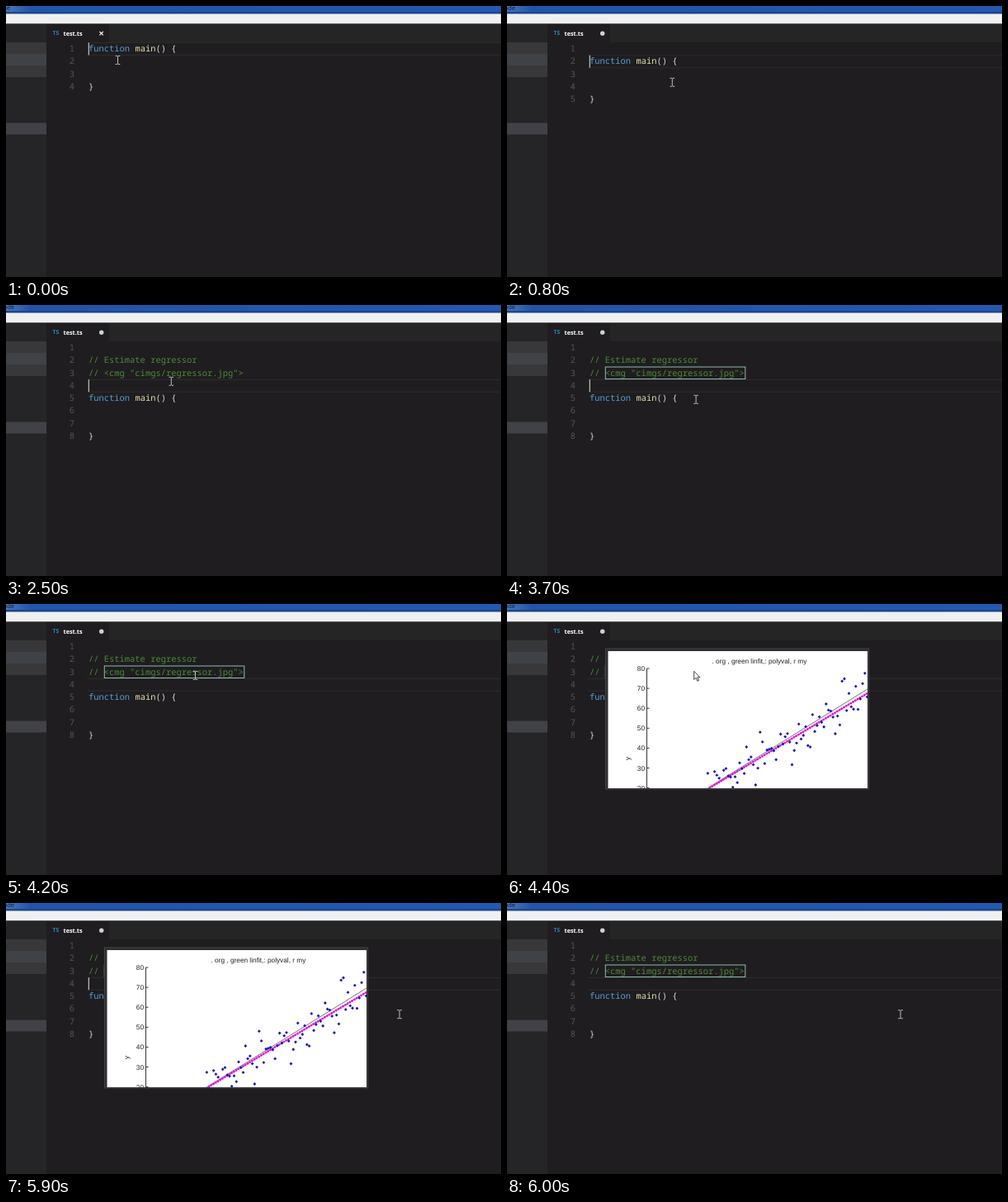
Write an HTML page that moves like this. It is 600 by 328 pixels and loops after 6.1 s.

```html
<!DOCTYPE html>
<html lang="en">
<head>
<meta charset="utf-8">
<title>Editor image preview</title>
<style>
  html, body { margin: 0; width: 100%; height: 100%; overflow: hidden; background: #1f1d1f; }
  svg { display: block; width: 100%; height: 100%; }
  text { text-rendering: geometricPrecision; }
  .code { font: 500 10.45px "Noto Sans Mono", "DejaVu Sans Mono", monospace; fill: #dcdcdc; }
  .num { fill: #555; text-anchor: end; }
  .key { fill: #569cd6; }
  .name { fill: #e2e2b0; }
  .note { fill: #4c8a3a; }
  .ui { font: 700 7.3px "Open Sans", "Noto Sans", sans-serif; fill: #fff; }
  .ui.type { font-size: 6.8px; fill: #2d86b8; }
  .title { font: 7.5px "Open Sans", sans-serif; fill: #0b1730; text-anchor: end; }
  .plot { font: 8.28px "Liberation Sans", sans-serif; fill: #222; }
</style>
</head>
<body>
<svg viewBox="0 0 600 328">
  <defs>
    <linearGradient id="bar">
      <stop offset="0" stop-color="#4a78ba"/>
      <stop offset=".05" stop-color="#1f55ab"/>
      <stop offset="1" stop-color="#2159b3"/>
    </linearGradient>
    <clipPath id="plotClip"><rect x="122.5" y="57" width="314.5" height="166"/></clipPath>
  </defs>

  <rect width="600" height="328" fill="#1f1d1f"/>
  <rect y="21" width="600" height="23" fill="#252526"/>
  <rect x="49" y="22" width="76" height="22" fill="#1f1d1f"/>
  <rect y="22" width="49" height="306" fill="#252426"/>
  <rect y="44" width="49" height="42" fill="#38383a"/>
  <rect y="58" width="49" height="14" fill="#3f4347"/>
  <rect y="141.5" width="49" height="14" fill="#414247"/>
  <rect width="600" height="9.5" fill="url(#bar)"/>
  <rect y="7" width="600" height="2.5" fill="#1c4688"/>
  <rect y="9.5" width="600" height="11.8" fill="#eff0f2"/>
  <text id="title" class="title" y="5">Code</text>

  <text class="ui type" x="56.5" y="35.4">TS</text>
  <text class="ui" x="69.5" y="36">test.ts</text>
  <path id="close" d="M113.4 31l4.4 4.4m0-4.4l-4.4 4.4" stroke="#eee" stroke-width="1.3"/>
  <circle id="dirty" cx="115.7" cy="33.2" r="2.7" fill="#d0d0d0"/>

  <path id="current" d="M98 44.5H600M98 59.3H600" stroke="#2b2a2b" stroke-width="1.2"/>
  <g id="numbers" class="code"></g>
  <g id="notes" class="code">
    <text class="note" x="100" y="70.4">// Estimate regressor</text>
    <text class="note" x="100" y="85.7">// &lt;cmg "cimgs/regressor.jpg"&gt;</text>
  </g>
  <g id="body" class="code">
    <text x="100" y="55.1"><tspan class="key">function</tspan> <tspan class="name">main</tspan>() {</text>
    <text x="100" y="100.9">}</text>
  </g>
  <rect id="link" x="119.3" y="75" width="169.5" height="14.5" fill="none" stroke="#8fb9b4"/>
  <rect id="caret" x="99.8" y="44.4" width="1" height="15" fill="#e4e4e4"/>

  <g id="popup">
    <rect x="119.5" y="54" width="319" height="170" fill="#2d2d30" stroke="#424244"/>
    <rect x="122.5" y="57" width="314.5" height="166" fill="#fff"/>
    <g id="plot" class="plot" clip-path="url(#plotClip)">
      <text x="248.5" y="71.6">. org , green linfit,: polyval, r my</text>
      <text transform="translate(149 189) rotate(-90)">y</text>
      <path d="M169.5 78V224" stroke="#333"/>
      <path d="M243 223L437 103" stroke="#5c6e5c" stroke-width=".9"/>
      <path d="M246 222.3L437 108" stroke="#e414dc" stroke-width="2.8" stroke-linecap="round" stroke-dasharray=".01 3.2"/>
      <path d="M246 222.3L437 108" stroke="#e414dc" stroke-width=".8"/>
    </g>
  </g>

  <g id="mouse">
    <path id="beam" d="M-2.8-5H-.6L0-4.4L.6-5H2.8M-2.8 5H-.6L0 4.4L.6 5H2.8M0-4.4V4.4" fill="none" stroke="#d0d0d0" stroke-width=".9"/>
    <path id="arrow" d="M0 0V10.2L2.4 8L4.1 12L5.8 11.2L4.1 7.4H7.2Z" fill="#fff" stroke="#333" stroke-width=".9"/>
  </g>
</svg>
<script>
const LOOP = 6100, STEP = 100, ROW = 15.26, BLINK = 500;
const el = id => document.getElementById(id);
const add = (parent, tag, attrs, text = '') => {
  const node = document.createElementNS('http://www.w3.org/2000/svg', tag);
  for (const key in attrs) node.setAttribute(key, attrs[key]);
  node.textContent = text;
  return parent.appendChild(node);
};
const show = (node, on) => node.style.display = on ? '' : 'none';
const move = (id, x, y) => el(id).setAttribute('transform', `translate(${x} ${y})`);

const numbers = Array.from({ length: 8 }, (_, i) =>
  add(el('numbers'), 'text', { class: 'num', x: 83, y: 55.1 + ROW * i }, i + 1));

for (let i = 0; i < 7; i++) {
  const y = 78 + 24.1 * i;
  add(el('plot'), 'path', { d: `M169.5 ${y}h3`, stroke: '#333' });
  add(el('plot'), 'text', { x: 167, y: y + 3, 'text-anchor': 'end' }, 80 - 10 * i);
}

// Scatter: bell-shaped noise around the fitted line.
let seed = 7;
const random = () => (seed = seed * 16807 % 2147483647) / 2147483647;
let dots = '';
for (let x = 213; x < 437; x += 2.76) {
  const noise = (random() + random() + random() - 1.5) * 26;
  const y = 222 - (x - 246) * 0.6 + noise;
  dots += `M${x} ${y - 1.9}l1.9 1.9l-1.9 1.9l-1.9-1.9z`;
}
add(el('plot'), 'path', { d: dots, fill: '#1414b4' });

// Two line breaks, a pasted comment and a final line break.
const edits = [0, 800, 1500, 2000, 2500];
const PASTE = 3;

const hover = { link: 3000, open: 4400, leave: 5800, close: 6000 };
const home = { x: 135.5, y: 65.5 };
const legs = [
  { from: 0, to: 200, x: 200.3, y: 92.3 },
  { from: 3000, to: 3600, x: 226, y: 176 },
  { from: 3600, to: 3700, x: 229.1, y: 114.3 },
  { from: 3700, to: 4200, x: 229.5, y: 86.5 },
  { from: 4300, to: 4400, x: 226.7, y: 81.3 },
  { from: 5400, to: 5800, x: 477, y: 134.7 }
];

function mouseAt(t) {
  let { x, y } = home;
  for (const leg of legs) {
    const p = Math.min(1, Math.max(0, (t - leg.from) / (leg.to - leg.from)));
    x += (leg.x - x) * p;
    y += (leg.y - y) * p;
  }
  return [x, y];
}

function render(t) {
  const row = edits.findLastIndex(time => time <= t);
  const caretRow = row > 1 ? row - 1 : row;
  const edited = row > 0;
  const arrow = t >= hover.open && t < hover.leave;

  move('body', 0, row * ROW);
  move('caret', row === PASTE ? 188 : 0, caretRow * ROW);
  move('current', 0, caretRow * ROW);
  move('mouse', ...mouseAt(t));
  move('title', edited ? 10 : 5, 0);
  numbers.forEach((number, i) => show(number, i < 4 + row));
  show(el('caret'), (t - edits[row]) % (2 * BLINK) < BLINK);
  show(el('close'), !edited);
  show(el('dirty'), edited);
  show(el('notes'), row >= PASTE);
  show(el('link'), t >= hover.link);
  show(el('popup'), t >= hover.open && t < hover.close);
  show(el('arrow'), arrow);
  show(el('beam'), !arrow);
}

const start = performance.now();
function tick() {
  const t = (performance.now() - start) % LOOP;
  render(Math.floor(t / STEP) * STEP);
  requestAnimationFrame(tick);
}
tick();
</script>
</body>
</html>
```
